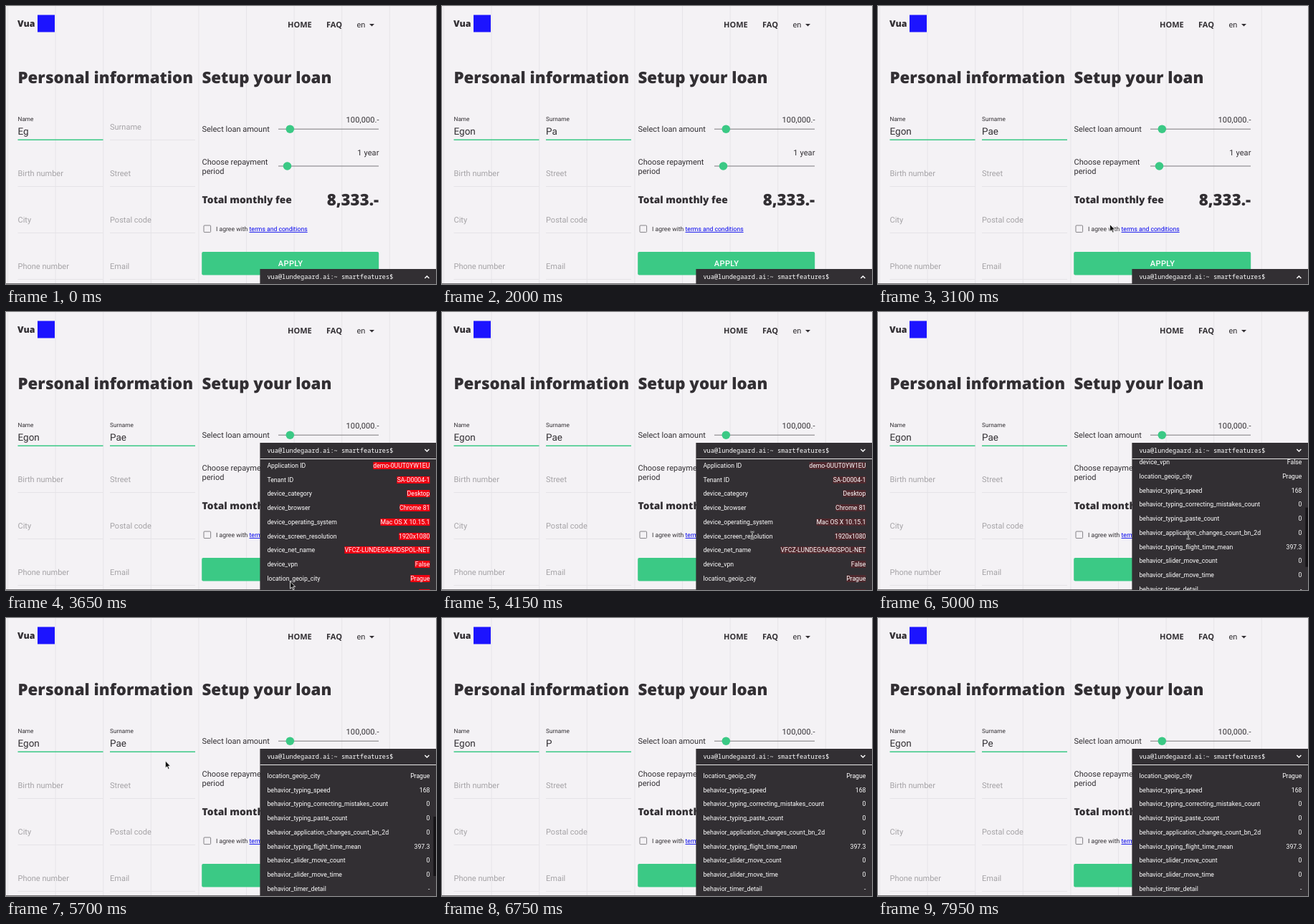
An HTML page that plays this animation: 600 px wide and 389 px high, repeating every 8000 ms.

```html
<!DOCTYPE html>
<html lang="en">
<head>
<meta charset="utf-8">
<title>Loan form</title>
<style>
html, body { margin: 0; width: 100%; height: 100%; overflow: hidden; background: #f4f2f5; }
#stage { position: relative; width: 600px; height: 389px; overflow: hidden; }
svg { position: absolute; left: 0; top: 0; }
svg text { font-family: Roboto, sans-serif; font-size: 11px; fill: #322f33; text-rendering: geometricPrecision; }
svg .title { font: 800 22.25px "Open Sans", sans-serif; }
svg .total { font: 800 13.75px "Open Sans", sans-serif; }
svg .brand { font: 800 12.4px "Open Sans", sans-serif; }
svg .nav { font: 700 11px "Open Sans", sans-serif; }
svg .hint { fill: #a5a3a6; }
svg .value { font-size: 13.5px; }
svg .small { font-size: 8.65px; }
svg .link { fill: #0000ee; text-decoration: underline; }
svg .button { font-weight: 500; fill: #fff; letter-spacing: .4px; }
svg .end { text-anchor: end; }
svg .amount { letter-spacing: .1px; }
#panel { position: absolute; left: 0; top: 0; width: 246px; height: 206px; overflow: hidden;
  background: #322f33; color: #fff; }
#prompt { position: absolute; left: 10px; top: 0; line-height: 22px; white-space: pre;
  font-family: "Noto Sans Mono", monospace; font-size: 8.63px; }
#view { position: absolute; left: 0; right: 0; top: 22px; bottom: 0; overflow: hidden; border-top: 1px solid #e8e8e8;
  box-sizing: border-box; }
#rows { position: absolute; left: 10px; width: 227px; top: -1px; font: 8.7px Roboto, sans-serif; }
.row { display: flex; justify-content: space-between; align-items: center; height: 19.75px; white-space: nowrap; }
#bar { position: absolute; right: 0; top: 0; width: 4px; height: 83px; background: #151316; }
</style>
</head>
<body>
<div id="stage">
  <svg id="page" width="600" height="389"></svg>
  <div id="panel">
    <div id="prompt">vua@lundegaard.ai:~ smartfeatures$</div>
    <svg width="246" height="22"><path id="chevron" d="M-3 1.6L0 -1.5L3 1.6" fill="none" stroke="#fff" stroke-width="1.4"/></svg>
    <div id="view"><div id="rows"></div><div id="bar"></div></div>
  </div>
  <svg width="600" height="389">
    <g id="pointer">
      <path id="arrow" d="M0 0V10.2L2.4 8L4 11.8L5.7 11L4.1 7.4H7.2Z" fill="#111" stroke="#fff" stroke-width=".8"/>
      <g id="beam" fill="none">
        <path d="M-2.5 -5Q0 -5 0 -3.5V3.5Q0 5 -2.5 5M2.5 -5Q0 -5 0 -3.5M0 3.5Q0 5 2.5 5" stroke="#ddd" stroke-width="2"/>
        <path d="M-2.5 -5Q0 -5 0 -3.5V3.5Q0 5 -2.5 5M2.5 -5Q0 -5 0 -3.5M0 3.5Q0 5 2.5 5" stroke="#333" stroke-width=".9"/>
      </g>
    </g>
  </svg>
</div>
<script>
const LOOP = 8000, GREEN = '#3bc985', FAINT = '#e5e3e7';
const $ = id => document.getElementById(id);
const page = $('page');

function add(tag, attrs, text) {
  const el = document.createElementNS('http://www.w3.org/2000/svg', tag);
  for (const key in attrs) el.setAttribute(key, attrs[key]);
  if (text) el.textContent = text;
  return page.appendChild(el);
}
const label = (x, y, text, cls = '') => add('text', { x, y, class: cls }, text);
const rect = (x, y, width, height, fill, more) => add('rect', { x, y, width, height, fill, ...more });

// Page
for (let i = 0; i < 9; i++) rect(2 + i * 66.6, 0, 1, 389, '#e6e4e8');
label(16, 29, 'Vua', 'brand');
rect(44, 12.5, 24, 24, '#1c14ff');
label(393, 30.3, 'HOME', 'nav');
label(447, 30.3, 'FAQ', 'nav');
label(489.5, 30, 'en');
add('path', { d: 'M507 25H514L510.5 28.5Z', fill: '#322f33' });
label(16.5, 107.5, 'Personal information', 'title');
label(273.5, 107.5, 'Setup your loan', 'title');

const columns = [16.5, 145];
[['Birth number', 'Street'], ['City', 'Postal code'], ['Phone number', 'Email']].forEach((names, r) =>
  names.forEach((name, c) => {
    label(columns[c], 238 + r * 65, name, 'hint');
    rect(columns[c], 252 + r * 65, 119, 1, FAINT);
  }));
rect(145, 187, 119, 1, FAINT);
label(16.5, 160.6, 'Name').style.fontSize = '8.25px';
rect(16.5, 186.5, 119, 1.5, GREEN);
const surnameLabel = label(0, 0, 'Surname');
const surnameLine = rect(145, 186.5, 119, 1.5, GREEN);
const nameText = label(16.5, 180, '', 'value');
const surnameText = label(145, 180, '', 'value');

label(273.5, 176, 'Select loan amount');
label(273.5, 221.5, 'Choose repayment');
label(273.5, 234.5, 'period');
label(520.7, 163, '100,000.-', 'end amount');
label(520.5, 209, '1 year', 'end amount');
for (const [x, y] of [[396.3, 172.2], [392.5, 224]]) {
  rect(380, y - .5, 140, 1, '#7d7b7e');
  add('circle', { cx: x, cy: y, r: 5.8, fill: GREEN });
}
label(273.5, 276, 'Total monthly fee', 'total');
label(520.2, 279, '8,333.-', 'title end');
rect(276, 307, 9.6, 9.6, 'none', { stroke: '#858387', rx: 1 });
label(293, 315, 'I agree with', 'small');
label(339.5, 315, 'terms and conditions', 'small link');
rect(273.2, 344, 247, 32.6, GREEN, { rx: 2 });
label(397, 364.3, 'APPLY', 'button').setAttribute('text-anchor', 'middle');
rect(0, 388, 600, 1, '#6f6d70');

// Panel
const features = {
  'Application ID': 'demo-0UUT0YW1EU',
  'Tenant ID': 'SA-D0004-1',
  device_category: 'Desktop',
  device_browser: 'Chrome 81',
  device_operating_system: 'Mac OS X 10.15.1',
  device_screen_resolution: '1920x1080',
  device_net_name: 'VFCZ-LUNDEGAARDSPOL-NET',
  device_vpn: 'False',
  location_geoip_city: 'Prague',
  behavior_typing_speed: '168',
  behavior_typing_correcting_mistakes_count: '0',
  behavior_typing_paste_count: '0',
  behavior_application_changes_count_bn_2d: '0',
  behavior_typing_flight_time_mean: '397.3',
  behavior_slider_move_count: '0',
  behavior_slider_move_time: '0',
  behavior_timer_detail: '-'
};
const values = Object.entries(features).map(([key, value]) => {
  const row = document.createElement('div');
  row.className = 'row';
  for (const text of [key, value]) row.appendChild(document.createElement('span')).textContent = text;
  $('rows').append(row);
  return row.lastChild;
});

// Timing
const typedName = [[0, 'Eg'], [150, 'Ego'], [200, 'Egon']];
const typedSurname = [[0, ''], [1650, 'P'], [1900, 'Pa'], [2100, 'Pae'], [6350, 'Pa'], [6700, 'P'], [7350, 'Pe']];
// time, x, y, text cursor
const pointerPath = [
  [2600, 200, 190, 0], [2900, 272, 250, 0], [3150, 336, 319, 0], [3200, 346, 332, 0], [3350, 392, 374, 0],
  [3450, 396.5, 377, 0], [3800, 396.5, 377, 0], [3950, 418, 338, 1], [4050, 433, 312.5, 1],
  [5350, 433, 312.5, 1], [5420, 390, 290, 0], [5700, 222.5, 200, 0], [5850, 196, 181, 1], [6350, 190, 180, 1]
];

const progress = (t, from, to) => Math.min(1, Math.max(0, (t - from) / (to - from)));
const easeOut = u => 1 - (1 - u) ** 2;
const smooth = u => u * u * (3 - 2 * u);
const mix = (a, b, u) => a + (b - a) * u;
const latest = (steps, t) => steps.filter(step => step[0] <= t).pop();

function drawPointer(t) {
  const a = latest(pointerPath, t), b = pointerPath.find(point => point[0] > t);
  const shown = a && b;
  $('pointer').style.display = shown ? '' : 'none';
  if (!shown) return;
  const u = progress(t, a[0], b[0]);
  $('pointer').setAttribute('transform', `translate(${mix(a[1], b[1], u)} ${mix(a[2], b[2], u)})`);
  $('arrow').style.display = a[3] ? 'none' : '';
  $('beam').style.display = a[3] ? '' : 'none';
}

function draw(t) {
  nameText.textContent = latest(typedName, t)[1];
  surnameText.textContent = latest(typedSurname, t)[1];

  const focus = easeOut(progress(t, 750, 950));
  surnameLabel.setAttribute('transform', `translate(145 ${mix(173, 160.6, focus)}) scale(${mix(1, .75, focus)})`);
  surnameLabel.style.fill = `rgb(${mix(165, 50, focus)},${mix(163, 47, focus)},${mix(166, 51, focus)})`;
  surnameLine.setAttribute('width', 119 * focus);
  surnameLine.setAttribute('x', 145 + 59.5 * (1 - focus));

  const open = smooth(progress(t, 3400, 3600));
  $('panel').style.transform = `translate(354.4px, ${mix(368, 183, open)}px)`;
  $('chevron').setAttribute('transform', `translate(233 ${mix(11.5, 10.5, open)}) scale(1 ${open < .5 ? 1 : -1})`);
  $('view').style.visibility = open > 0 ? 'visible' : 'hidden';

  const red = 1 - progress(t, 3700, 4230);
  for (const value of values) value.style.background = `rgba(240,0,16,${red})`;

  const scroll = 152.5 * easeOut(progress(t, 4387, 5200));
  $('rows').style.transform = `translateY(${-scroll}px)`;
  $('bar').style.transform = `translateY(${scroll * .472}px)`;
  $('bar').style.opacity = t < 4387 ? 0 : 1 - progress(t, 5750, 6000);

  drawPointer(t);
}

const start = performance.now();
function tick() {
  draw((performance.now() - start) % LOOP);
  requestAnimationFrame(tick);
}
tick();
</script>
</body>
</html>
```
